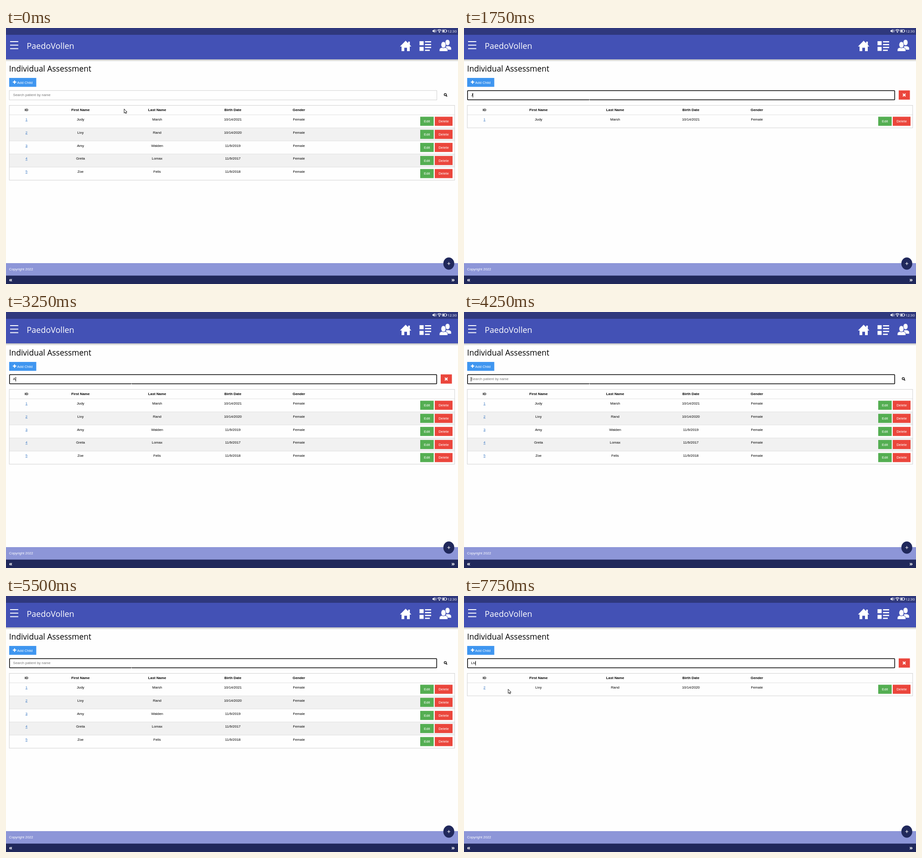
Write an HTML page that moves like this. It is 993 px wide and 564 px high and loops after 8 s.

```html
<!DOCTYPE html>
<html lang="en">
<head>
<meta charset="utf-8">
<title>Individual Assessment</title>
<style>
  html, body { margin: 0; width: 100%; height: 100%; overflow: hidden; background: #fefefe; }
  svg { display: block; width: 100%; height: 100%; }
  text { font: 7.8px "Liberation Sans", Arial, sans-serif; white-space: pre; }
  .ui { font-family: "Open Sans", "Noto Sans", sans-serif; }
  .mid { text-anchor: middle; }
  .bold { font-weight: 700; }
  .light { fill: #fff; }
  .link { fill: #3a78c3; text-decoration: underline; }
</style>
</head>
<body>
<svg id="stage" viewBox="0 0 993 564">
  <defs>
    <linearGradient id="shade" x2="0" y2="1">
      <stop stop-color="#000" stop-opacity=".26"/>
      <stop offset="1" stop-color="#000" stop-opacity="0"/>
    </linearGradient>
  </defs>
  <rect width="993" height="564" fill="#fefefe"/>

  <!-- status bar and header -->
  <rect y="69" width="993" height="5" fill="url(#shade)"/>
  <rect y="14" width="993" height="55" fill="#4351b5"/>
  <rect width="993" height="15" fill="#2f387d"/>
  <g fill="#fff">
    <path d="M937 5h2l2.5-2.4v8L939 8.300h-2z"/>
    <path d="M942.600 4.600q1.700 2 0 4M944 3.200q2.800 3.400 0 6.800" fill="none" stroke="#fff" stroke-width=".8"/>
    <path d="M947.800 5.200q4.300-3.600 8.600 0M949.400 7.100q2.700-2.200 5.400 0" fill="none" stroke="#fff" stroke-width="1.200"/>
    <circle cx="952.100" cy="9" r="1.300"/>
    <rect x="958.500" y="3.800" width="9" height="5.600" rx=".7" fill="none" stroke="#fff" stroke-width=".9"/>
    <path d="M959.700 5h3.800v3.200h-3.800zM968 5.400h1v2.400h-1z"/>
  </g>
  <text class="ui light" x="970" y="9.800" style="font-size:7.900px">12:30</text>
  <path d="M9 30h18M9 37.700h18M9 45.400h18" stroke="#fff" stroke-width="2"/>
  <text class="ui light" x="45.500" y="46.300" style="font-size:18px">PaedoVollen</text>
  <g fill="#fff">
    <path d="M878 28l5.500 5.600V30h3.700v7.300l3.300 3.400H887V51h-6v-7.500h-6V51h-6V40.700h-3.500z"/>
    <path d="M908.500 29h9v9h-9zM908.500 41.500h9v9h-9zM920.500 29H934v2.700h-13.500zM920.500 35.300H934V38h-13.500zM920.500 41.500H934v2.700h-13.500zM920.500 47.800H931v2.700h-10.500z"/>
    <g id="people" stroke="#4351b5" stroke-width="1">
      <path d="M966 47.500V40q5-1 8.500 0 3.500 1.300 4 4v4.300h-12z"/>
      <ellipse cx="970" cy="32" rx="5.200" ry="6.700"/>
      <path d="M952 51.500v-4q.5-3.600 5-4.500h8q4.800 1 5.500 4.500v4z"/>
      <ellipse cx="961" cy="37" rx="5.300" ry="7"/>
    </g>
  </g>

  <!-- page controls -->
  <text class="ui" x="6.700" y="96" style="font-size:17.450px">Individual Assessment</text>
  <rect x="7" y="110" width="59.500" height="19.600" fill="#3f96f0"/>
  <path d="M15 119.200h7.600M18.800 115.400v7.600" stroke="#fff" stroke-width="2.200"/>
  <text class="light" x="24.600" y="122.500">Add Child</text>
  <rect id="field"/>
  <rect id="beam" x="275" y="158" width="1" height="1" fill="#fff"/>
  <text id="query" x="15.500" y="150.400"></text>
  <rect id="caret" y="143" width="1" height="10"/>
  <g id="lens" fill="none" stroke="#000">
    <circle cx="965" cy="146.700" r="2.400" stroke-width="1.300"/>
    <path d="M966.800 148.600l2.200 2.200" stroke-width="1.700"/>
  </g>
  <g id="clear">
    <rect x="955" y="137.500" width="24.600" height="20.300" fill="#eb463c"/>
    <path d="M964.200 144.700l5.800 5.800m0-5.800l-5.800 5.800" stroke="#fff" stroke-width="2.200"/>
  </g>

  <!-- table -->
  <g id="head"></g>
  <g id="body"></g>
  <rect id="frame" x="7.200" y="170.500" width="978.500" fill="none" stroke="#ccc" stroke-width=".9"/>

  <!-- footer -->
  <rect y="518" width="993" height="28" fill="#8d96d8"/>
  <rect y="545.500" width="993" height="18.500" fill="#20285b"/>
  <text class="light" x="6.800" y="533.800">Copyright 2022</text>
  <text class="ui light bold" x="6.500" y="559" style="font-size:12px">«</text>
  <text class="ui light bold" x="978.500" y="559" style="font-size:12px">»</text>
  <ellipse cx="972.800" cy="519" rx="12" ry="13.400" fill="#20285b"/>
  <path d="M969.500 519h6.600M972.800 515.700v6.600" stroke="#fff" stroke-width="1.100"/>

  <path id="pointer" d="M0 0V9.200L2.200 7.300 3.600 10.400 5 9.800 3.700 6.800H6.400Z" fill="#fff" stroke="#000" stroke-width=".9"/>
</svg>
<script>
const LOOP = 8000, ROW_TOP = 191.2, ROW_HEIGHT = 28.8;
const columns = [45, 163.7, 332, 498.4, 643.5];
const headings = ["ID", "First Name", "Last Name", "Birth Date", "Gender"];
const children = [
  ["Judy", "Marsh", "10/14/2021"],
  ["Livy", "Rand", "10/14/2020"],
  ["Amy", "Walden", "11/9/2019"],
  ["Greta", "Lomax", "11/9/2017"],
  ["Zoe", "Fells", "11/9/2018"]
].map(([first, last, born], i) => [i + 1, first, last, born, "Female"]);

// Each list holds [start in ms, value].
const typed = [[0, ""], [1750, "J"], [2250, ""], [3250, "A"], [3750, ""], [4750, "L"],
  [5500, ""], [6000, "L"], [6500, "Li"], [6750, "Liv"]];
const filters = [[0, ""], [1750, "J"], [2250, ""], [3500, "A"], [4000, ""], [4750, "L"],
  [5500, ""], [6250, "L"], [6750, "Liv"]];
const carets = [[0, false], [1000, true], [2250, false], [2750, true], [3750, false], [4250, true],
  [5250, false], [5750, true], [7250, false], [7750, true]];
const pointers = [[0, [259.5, 178.3]], [250, null], [7500, [238, 177]], [7750, [97, 205.3]]];

const el = id => document.getElementById(id);
const at = (steps, t) => steps.filter(([start]) => start <= t).pop()[1];
const show = (id, on) => el(id).setAttribute("visibility", on ? "visible" : "hidden");
const set = (id, attrs) => Object.entries(attrs).forEach(([k, v]) => el(id).setAttribute(k, v));
const label = (x, y, s, cls = "") => `<text class="mid ${cls}" x="${x}" y="${y}">${s}</text>`;
const button = (x, y, w, color, s) =>
  `<rect x="${x}" y="${y + 4.3}" width="${w}" height="20" fill="${color}"/>` +
  label(x + w / 2, y + 17, s, "light");

function rowMarkup(child, i) {
  const y = ROW_TOP + i * ROW_HEIGHT;
  return `<rect x="7.2" y="${y}" width="978.5" height="${ROW_HEIGHT}" fill="${i % 2 ? "#f1f1f1" : "#fefefe"}"/>` +
    `<path d="M7.2 ${y}h978.5" stroke="#ddd" stroke-width=".9"/>` +
    child.map((s, c) => label(columns[c], y + 12.7, s, c ? "" : "link")).join("") +
    button(910, y, 29.6, "#54ae52", "Edit") + button(942, y, 39, "#eb463c", "Delete");
}

let shownFilter = null;
function drawTable(filter) {
  if (filter === shownFilter) return;
  shownFilter = filter;
  const rows = children.filter(([, first, last]) =>
    `${first} ${last}`.toLowerCase().includes(filter.toLowerCase()));
  el("body").innerHTML = rows.map(rowMarkup).join("");
  set("frame", { height: ROW_TOP + rows.length * ROW_HEIGHT - 170.5 });
}

function draw(t) {
  const text = at(typed, t), pointer = at(pointers, t), focused = t >= 500;
  set("field", focused
    ? { x: 7.75, y: 138, width: 938.5, height: 20.25, rx: 1.2, fill: "#fff", stroke: "#000", "stroke-width": 1.5 }
    : { x: 7.2, y: 137.8, width: 939.3, height: 20.6, rx: 0, fill: "#fff", stroke: "#ccc", "stroke-width": .9 });
  el("query").textContent = text || "Search patient by name";
  set("query", { fill: text ? "#000" : "#757575" });
  set("caret", { x: Math.round(15.3 + (text ? el("query").getComputedTextLength() : 0)) });
  show("caret", at(carets, t));
  show("clear", text);
  show("lens", !text);
  show("beam", t >= 250 && t < 7500);
  show("pointer", pointer);
  if (pointer) set("pointer", { transform: `translate(${pointer})` });
  drawTable(at(filters, t));
}

el("head").innerHTML = headings.map((s, c) => label(columns[c], 183.2, s, "bold")).join("");
const begin = performance.now();
function tick() {
  draw((performance.now() - begin) % LOOP);
  requestAnimationFrame(tick);
}
tick();
</script>
</body>
</html>
```
